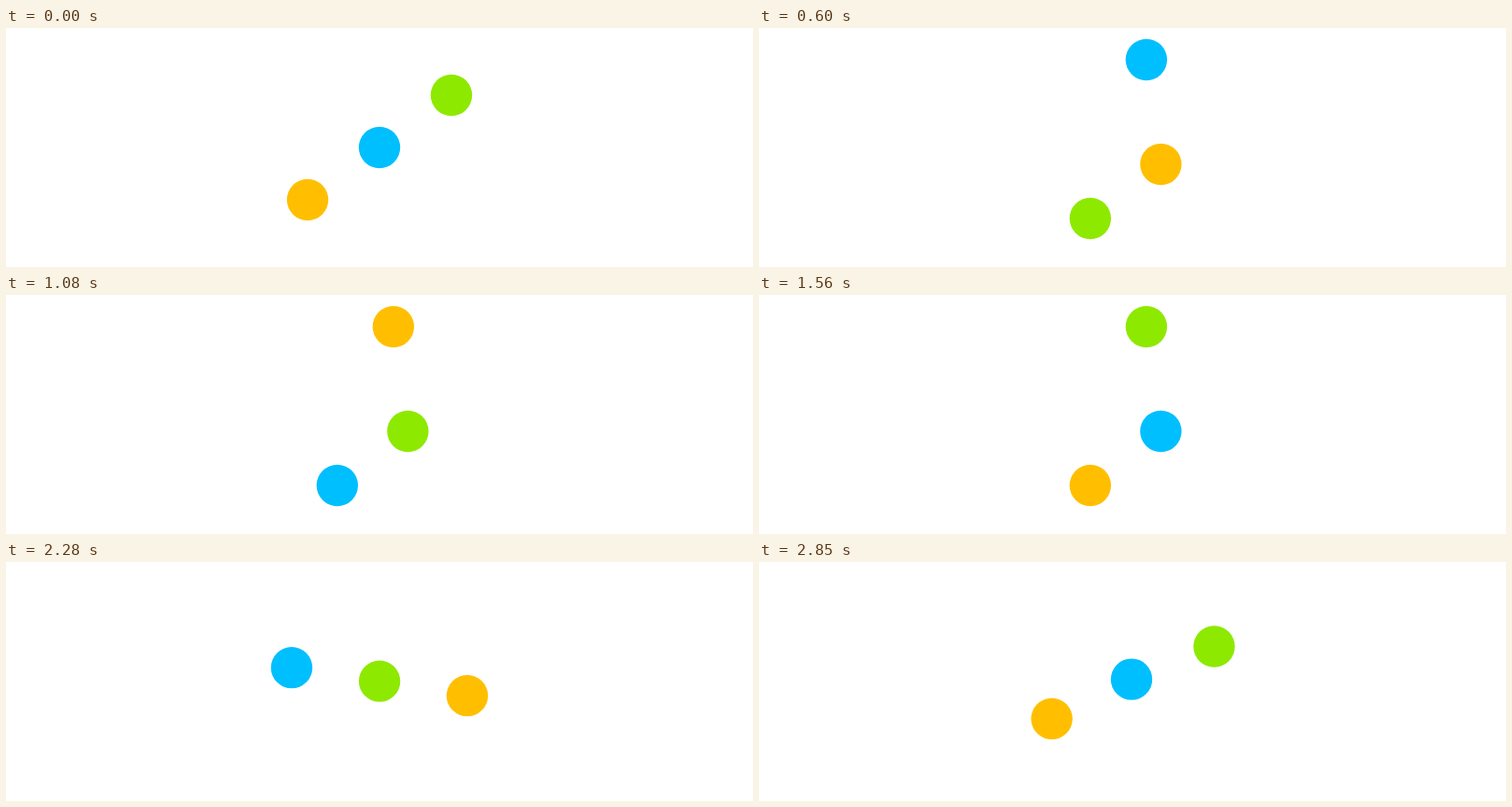
Recreate the animation shown at these times as an HTML page. Size 800 by 256 pixels, loop 2.88 s.

```html
<!DOCTYPE html>
<html lang="en">
<head>
<meta charset="utf-8">
<title>Three dots</title>
<style>
  html, body { margin: 0; width: 100%; height: 100%; overflow: hidden; background: #fff; }
  svg { display: block; width: 800px; height: 256px; }
</style>
</head>
<body>
<svg viewBox="0 0 800 256">
  <circle r="22.2" fill="#ffbf00"/>
  <circle r="22.2" fill="#00bfff"/>
  <circle r="22.2" fill="#8ee900"/>
</svg>
<script>
const LOOP = 2880, TICK = 30, TURN = 480;
const CX = 400, CY = 128, REACH = 95.2;
const TILT = Math.atan2(56, 77);
const dots = document.querySelectorAll('circle');

function bezier(x1, y1, x2, y2) {
  const at = (a, b, s) => 3 * a * s * (1 - s) ** 2 + 3 * b * s * s * (1 - s) + s ** 3;
  return x => {
    let lo = 0, hi = 1;
    for (let i = 0; i < 40; i++) {
      const mid = (lo + hi) / 2;
      if (at(x1, x2, mid) < x) lo = mid; else hi = mid;
    }
    return at(y1, y2, lo);
  };
}
const swap = bezier(0.35, 0, 0.4, 1.21);

const polar = (r, angle) => [r * Math.cos(angle), -r * Math.sin(angle)];

function place(index, x, y) {
  const dot = dots[(index + 3) % 3];
  dot.setAttribute('cx', (CX + x).toFixed(3));
  dot.setAttribute('cy', (CY + y).toFixed(3));
}

// The line makes half a turn while the two trailing dots change places.
function draw(ms) {
  const time = Math.floor((ms % LOOP + 0.5) / TICK) * TICK % LOOP;
  const turn = Math.floor(time / TURN) % 3;
  const p = time % TURN / TURN;
  const spin = TILT + Math.PI * p;
  const rod = spin - Math.PI * swap(p);
  const [leadX, leadY] = polar(REACH, spin);
  const [rodX, rodY] = polar(REACH / 2, rod);
  place(2 - turn, leadX, leadY);
  place(1 - turn, rodX - leadX / 2, rodY - leadY / 2);
  place(-turn, -rodX - leadX / 2, -rodY - leadY / 2);
}

const start = performance.now();
function loop() {
  draw(performance.now() - start);
  requestAnimationFrame(loop);
}
loop();
</script>
</body>
</html>
```
